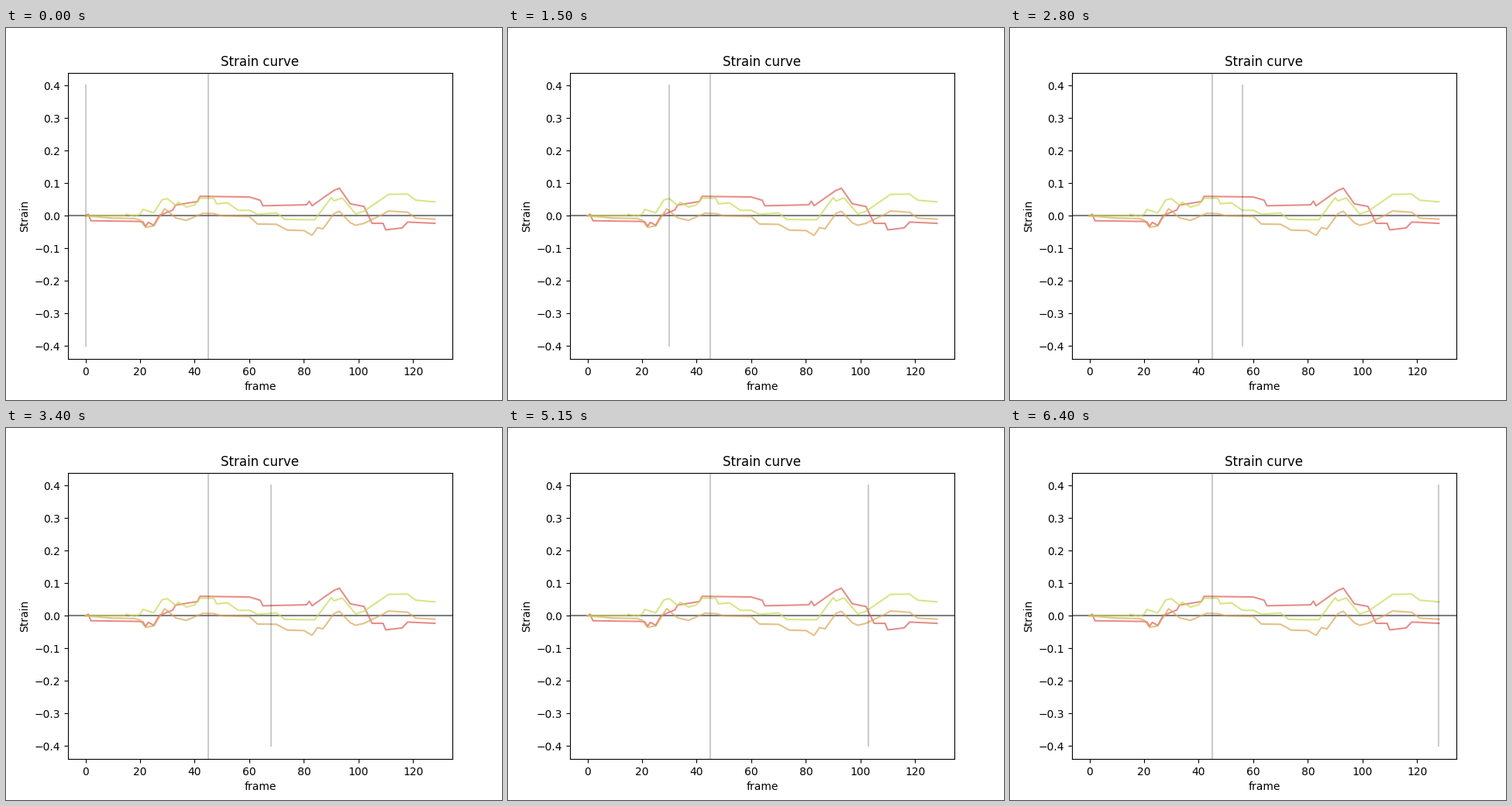
Write a matplotlib script that moves like this. It is 640 px wide and 480 px high and loops after 6.45 s.

```python
import numpy as np
import matplotlib.pyplot as plt
from matplotlib.animation import FuncAnimation

N = 129
PEAK = 45

# (frame, strain in thousandths) at the main bends of each curve
RED = [
    (0, 0), (1, 5), (2, -15), (19, -17), (21, -18), (22, -32), (23, -20),
    (25, -29), (27, 1), (32, 18), (33, 33), (41, 44), (42, 60), (60, 58),
    (64, 48), (65, 31), (81, 34), (82, 45), (83, 31), (87, 55), (91, 78),
    (93, 85), (97, 37), (102, 29), (105, -23), (109, -23), (110, -43),
    (116, -37), (118, -19), (128, -23),
]
ORANGE = [
    (0, 0), (10, -7), (18, -8), (20, -13), (22, -35), (25, -31), (29, 22),
    (33, -6), (37, -14), (43, 8), (47, 7), (50, 0), (60, -2), (63, -25),
    (70, -26), (74, -44), (80, -45), (83, -60), (85, -36), (87, -40),
    (91, 7), (93, 14), (97, -21), (99, -29), (102, -23), (109, 5),
    (111, 15), (118, 11), (121, -7), (128, -10),
]
GREEN = [
    (0, 0), (14, 0), (15, 5), (18, -1), (20, 5), (21, 20), (25, 9),
    (28, 49), (30, 53), (33, 32), (34, 42), (37, 27), (40, 34), (42, 54),
    (47, 54), (48, 37), (52, 40), (56, 17), (60, 17), (63, 5), (70, 9),
    (73, -11), (84, -12), (90, 56), (91, 46), (94, 55), (99, 6), (102, 14),
    (111, 66), (118, 67), (121, 48), (128, 43),
]

plt.rcParams["font.family"] = "DejaVu Sans"
fig, ax = plt.subplots(figsize=(6.4, 4.8), dpi=100)

ax.axhline(0, color="k", alpha=0.5)

frames = np.arange(N)
curves = [
    (RED, (0.86, 0.371, 0.34)),
    (ORANGE, (0.86, 0.655, 0.34)),
    (GREEN, (0.78, 0.86, 0.34)),
]
for bends, color in curves:
    strain = np.interp(frames, *zip(*bends)) / 1000
    ax.plot(frames, strain, color=color, alpha=0.7)

ax.axvline(PEAK, color="k", alpha=0.2)
cursor, = ax.plot([0, 0], [-0.4, 0.4], color="k", alpha=0.2)

ax.set(xlabel="frame", ylabel="Strain",
       xlim=(-6.4, 134.4), ylim=(-0.44, 0.44))
ax.set_title("Strain curve", x=0.499)


def update(i):
    cursor.set_xdata([i, i])
    return cursor,


anim = FuncAnimation(fig, update, frames=N, interval=50, repeat=True,
                     repeat_delay=0)
plt.show()
```
